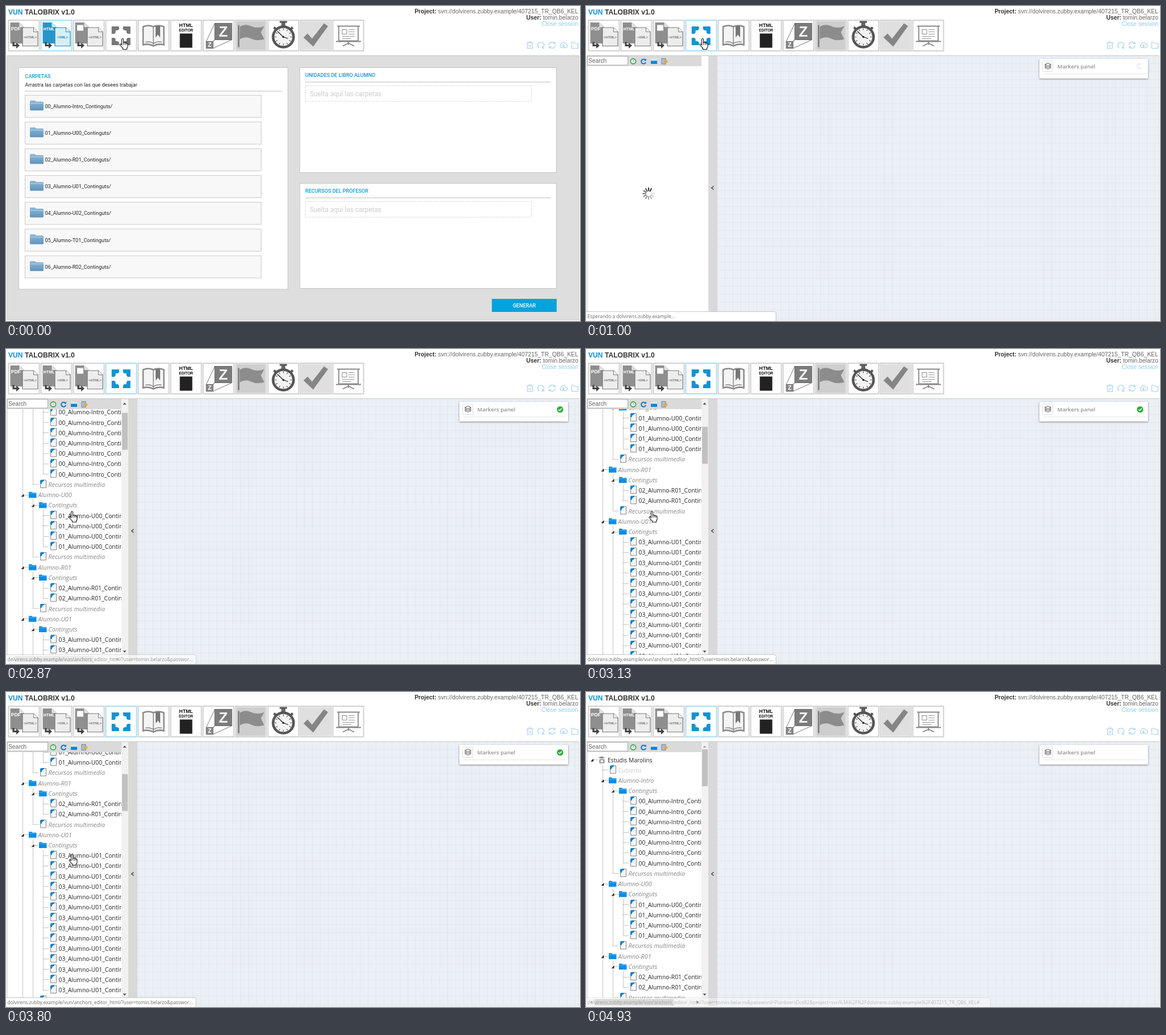
Animation, 1009 px wide and 555 px high, one loop 4.99 s. Source, as an HTML page:

```html
<!DOCTYPE html>
<html lang="es">
<head>
<meta charset="utf-8">
<style>
html, body { margin: 0; width: 100%; height: 100%; overflow: hidden; background: #fff; }
svg { display: block; }
text { white-space: pre; }
.arial { font-family: "Liberation Sans", sans-serif; }
.roboto { font-family: Roboto, sans-serif; }
.open { font-family: "Open Sans", sans-serif; }
.bold { font-weight: 700; }
.medium { font-weight: 500; }
.italic { font-style: italic; }
.cell { --edge: #d2d2d2; --dark: #8f8f8f; --pale: #ededed; --line: #777; --mark: #777; }
.cell.on { --edge: #a9def4; --dark: #2796cb; --pale: #d8edf8; --line: #1c86ba; --mark: #1593d0; }
</style>
</head>
<body>
<svg id="stage" width="1009" height="555" xmlns="http://www.w3.org/2000/svg"></svg>
<script>
const LOOP = 4990, ROW = 18.22;
const HOST = "dolvirens.zubby.example", USER = "tomin.belarzo", PROJECT = "407215_TR_QB6_KEL";
const LINK = `${HOST}/vun/anchors_editor_html/?user=${USER}&password=PlankversDot82` +
  `&project=svn%3A%2F%2F${HOST}%2F${PROJECT}#`;

const rect = (x, y, w, h, fill, more = "") =>
  `<rect x="${x}" y="${y}" width="${w}" height="${h}" fill="${fill}" ${more}/>`;
const path = (d, fill, stroke = "none", width = 1, more = "") =>
  `<path d="${d}" fill="${fill}" stroke="${stroke}" stroke-width="${width}" ${more}/>`;
const line = (d, stroke, width = 1, more = "") => path(d, "none", stroke, width, more);
const circle = (x, y, r, fill, stroke = "none", width = 1) =>
  `<circle cx="${x}" cy="${y}" r="${r}" fill="${fill}" stroke="${stroke}" stroke-width="${width}"/>`;
const text = (x, y, label, size, fill, font = "roboto", more = "") =>
  `<text x="${x}" y="${y}" font-size="${size}" fill="${fill}" class="${font}" ${more}>${label}</text>`;
const at = (x, y, content, more = "") => `<g transform="translate(${x} ${y})" ${more}>${content}</g>`;
const group = (id, content) => `<g id="${id}">${content}</g>`;
const END = 'text-anchor="end"', MID = 'text-anchor="middle"';

// Toolbar icons, drawn inside a 55 px cell
const convert = (from, to) =>
  path("M3.500 4.500H20L28 12V41.500H3.500Z", "var(--dark)") +
  path("M20 4.500V12H28", "#ddd", "#fff", .8) +
  from +
  path("M25 13.500H44.500L52 21V46H25Z", "var(--pale)", "var(--line)", 1.2) +
  path("M44.500 13.500V21H52", "#fff", "var(--line)", 1) +
  text(38.500, 32, `&lt;${to}&gt;`, 5.800, "var(--line)", "arial bold", MID) +
  line("M9 39V45H15", "#444", 3.200) + path("M14 40L20 45L14 50.500Z", "#444");
const fromText = label => text(4.800, 18.500, label, label.length > 3 ? 7.200 : 8.500, "#fff", "arial bold");
const corner = path("M10.500 10.500H23.500V15.500L21 17.500H17.500V21L15.500 23.500H10.500Z", "var(--mark)");
const markers = [0, 90, 180, 270].map(a =>
  `<g transform="translate(.2 1) rotate(${a} 27 27)">${corner}</g>`).join("");
const book =
  path("M9 12Q18 8 27 12Q36 8 45.500 12V44Q36 41 27 46Q18 41 9 44Z", "#f4f4f4", "#8a8a8a", 2.500) +
  line("M27 12V45M13 39Q21 37 27 42Q33 37 42 39", "#8a8a8a", 1.500) +
  path("M31 10.500H39V31L35 26L31 31Z", "#777");
const editor = text(27.500, 12, "HTML", 8.800, "#111", "arial bold", MID) +
  text(27.500, 20.500, "EDITOR", 6.600, "#111", "arial bold", MID) +
  rect(16.500, 24, 22, 25, "#222");
const zoom = line("M6 38L21 6M18 38L51 6M18 50L51 35M6 50L21 35", "#777", 1) +
  rect(21, 6, 30, 29, "#7c7c7c", 'stroke="#666"') + rect(6, 38, 12, 12, "#888", 'stroke="#666"') +
  text(36, 29.500, "Z", 26, "#f4f4f4", "arial bold", MID) +
  text(12, 47.500, "Z", 10, "#fff", "arial bold", MID);
const flag = rect(2, 2, 51, 51, "#cecece") + line("M6 9V48", "#777", 2.500) +
  path("M8 12Q17 6 28 11T51 11L45 22L51 34Q38 38 28 33T8 34Z", "#8c8c8c");
const ticks = [...Array(12)].map((_, i) =>
  line("M27.500 15V18", "#444", 1, `transform="rotate(${i * 30} 27.500 30)"`)).join("");
const watch = rect(24, 3, 7, 8, "#666") + rect(21, 2, 13, 3, "#555") +
  line("M11 13L14 16M44 13L41 16", "#555", 4) +
  circle(27.500, 30, 18, "#f3f3f3", "#555", 4.500) + ticks +
  line("M17 20L27.500 30L36 33", "#222", 1.300) + circle(27.500, 30, 1.800, "#222");
const tick = rect(2, 2, 51, 51, "#dfdfdf") + path("M6 31L13 24L21 33L42 6L49 11L23 47Z", "#858585");
const screen = line("M8 11H48M11 11V37H45V11M28 37V44M18 46L28 41L38 46M6 38H50", "#888", 1.800) +
  rect(17, 17, 8, 8, "none", 'stroke="#888"') +
  line("M28 17H39M28 21H39M28 25H39M17 29H39M17 33H33", "#999", 1.200);

const cells = [
  convert(fromText("PDF"), "HTML"), convert(fromText("HTML"), "XML"),
  convert(rect(7, 9, 11, 10, "#fff"), "HTML"),
  markers, book, editor, zoom, flag, watch, tick, screen
].map((icon, i) => at(4 + 57 * i, 24.500,
  rect(.5, .5, 54, 54, "#fff", 'stroke="var(--edge)" stroke-width="2"') + icon,
  `id="cell${i}" class="cell"`)).join("");

const LIGHT = "#a3cde9";
const links =
  at(921, 69, line("M-6 -4H6M-2 -4V-6H2V-4M-4.500 -4V6H4.500V-4M-1.500 -1V4M1.500 -1V4", LIGHT)) +
  at(940, 69, line("M-2.500 5A5.500 5.500 0 1 1 3 5M3 1.500V5.500H6.500", LIGHT, 1.100)) +
  at(960, 69, line("M-5.500 0A5.500 5.500 0 0 1 4.500 -3M5 -6V-2.500H1.500M5.500 0A5.500 5.500 0 0 1 -4.500 3M-5 6V2.500H-1.500", LIGHT, 1.100)) +
  at(980, 69, line("M-3 4.500A3.200 3.200 0 0 1 -4 -1.500A4 4 0 0 1 3.500 -2.500A3.500 3.500 0 0 1 3 4.500ZM0 -2V3M-2 1L0 3L2 1", LIGHT, 1.100)) +
  at(1000, 69, line("M-5.500 5.500V-5H-1L.5 -3H5.500V5.500Z", LIGHT, 1.100));

const header =
  text(4, 14.500, '<tspan fill="#1191cf">VUN</tspan> TALOBRIX v1.0', 12.100, "#333", "arial bold") +
  text(1006, 12.500, `<tspan class="bold" fill="#333">Project:</tspan> svn://${HOST}/${PROJECT}`, 10.350, "#666", "arial", END) +
  text(1006, 23.800, `<tspan class="bold" fill="#333">User:</tspan> ${USER}`, 10.350, "#666", "arial", END) +
  text(1006, 35, "Close session", 10.350, "#8ccbe8", "arial", END) + cells + links;

// First page: folder list and drop zones
const BLUE = "#1496d2";
const card = (x, y, w, h) => rect(x + .5, y + .5, w, h, "#fff", 'stroke="#c4c4c4"');
const folder = path("M0 3Q0 1 2 1H9L11 3H22Q24 3 24 5V17Q24 18.500 22 18.500H2Q0 18.500 0 17Z", "url(#folderFill)") +
  line("M1 6H23", "#b9d4e8", 1);
const names = ["Intro", "U00", "R01", "U01", "U02", "T01", "R02"];
const list = names.map((name, i) => at(33, 157 + 47.150 * i,
  rect(.5, .2, 415, 39, "#f8f8f8", 'stroke="#c8c8c8"') + at(9, 8.500, folder) +
  text(35.500, 22.800, `0${i}_Alumno-${name}_Continguts/`, 9.100, "#222"))).join("");
const dropZone = (y, title) => card(516, y, 451, 185) +
  text(526, y + 17, title, 9.050, BLUE, "roboto medium") + rect(526, y + 25.500, 432, 1, "#bbb") +
  rect(526.500, y + 32.500, 397, 27.500, "#fff", 'stroke="#d4d4d4" stroke-dasharray="2.500 1.500"') +
  text(534, y + 50.500, "Suelta aquí las carpetas", 11.850, "#ccc");
const home = rect(2, 87.500, 1005, 465.500, "#dedede", 'stroke="#c6c6c6"') + card(22, 108, 473, 390.500) +
  text(33.500, 127, "CARPETAS", 9.050, BLUE, "roboto medium") +
  text(33.500, 142, "Arrastra las carpetas con las que desees trabajar", 9.110, "#222") +
  rect(33, 149.500, 453, 1, "#bbb") + list +
  dropZone(108, "UNIDADES DE LIBRO ALUMNO") + dropZone(312, "RECURSOS DEL PROFESOR") +
  rect(854, 516, 114, 23, "#05a3dd") +
  text(911, 531, "GENERAR", 9.050, "#fff", "roboto medium", MID);

// Second page: tree and canvas
const docIcon = path("M4 .5H10.500V14H.5V4Z", "#f4f6f8", "#858585", 1) + path("M0 7V2Q0 0 2 0H7V2Q3 3 2.500 7Z", "#1480c8");
const folderIcon = path("M0 1.500Q0 .5 1 .5H5L6.500 2H13.500V11H0Z", "#0c8ce6") + line("M0 3.500H13.500", "#6bbcf4", .8);
const expander = path("M0 5H5V0Z", "#222");
const bookcase = path("M0 2L6 0L12 2L6 4ZM2 5H11V12H2Z", "#888") + rect(4, 6.500, 5, 4, "#fff");
const guide = d => line(d, "#888", 1, 'stroke-dasharray="1 1"');

let labels = "", icons = "", row = 0;
const rowY = () => 120 + ROW * row;
function addRow(label, x, icon, style = "italic", fill = "#888") {
  const y = rowY(), open = icon === folderIcon || icon === bookcase, left = x - (icon === docIcon ? 14.500 : 16.500);
  labels += text(x, y + 3.500, label, style ? 10.800 : 10.300, fill, "open " + style);
  icons += guide(`M${x - 27.500} ${Math.round(y) - .5}H${x - 17}`) +
    at(left, y - (icon === docIcon ? 9 : 6.500), icon) + (open ? at(x - 30, y - 2.500, expander) : "");
  row++;
}
addRow("Estudis Marolins", 38, bookcase, "", "#222");
icons += guide("M29.500 128V1400");
addRow("Cubierta", 56.500, docIcon, "italic", "#ccc");
[7, 4, 2, 14, 12].forEach((count, i) => {
  const top = rowY() + 8;
  addRow(`Alumno-${names[i]}`, 56.500, folderIcon);
  addRow("Continguts", 74.500, folderIcon);
  for (let n = 0; n < count; n++) addRow(`0${i}_Alumno-${names[i]}_Continguts`, 92.500, docIcon, "", "#222");
  icons += guide(`M47.500 ${top}V${rowY()}M65.500 ${top + ROW}V${rowY() - ROW}`);
  addRow("Recursos multimedia", 74.500, docIcon);
});

const sideTools = rect(2, 88, 201, 18, "#dadada") + rect(2.500, 88.500, 71, 15.500, "#fff", 'stroke="#aaa"') +
  text(4, 100, "Search", 10.200, "#666", "arial") +
  circle(83, 97.500, 4.500, "#fff", "#3aa655", 1.800) + line("M83 95V98", "#3aa655", 1.200) +
  line("M104.500 95.500A4 4 0 1 0 105 99", "#1479c9", 2) + path("M102 96.500H106V92.500Z", "#1479c9") +
  rect(114, 93, 11, 9, "#1683d0") + rect(114, 93, 11, 3.500, "#d6ecfb") +
  rect(133, 92.500, 7, 10, "#a9bfd4", 'stroke="#6f8aa5"') + path("M137 96H140V94L144 98L140 102V100H137Z", "#f0a33a");
const bars = rect(203, 88, 12, 452, "#f1f1f1") + rect(2, 540, 213, 13, "#f1f1f1") +
  rect(204, 101, 10, 65, "#c1c1c1", 'id="thumb"') + rect(15, 541, 139, 11, "#c1c1c1") +
  path("M205.500 98L208.500 94.500L211.500 98Z", "#505050", "none", 1, 'id="upArrow"') +
  path("M205.500 531.500L208.500 535L211.500 531.500Z", "#505050") +
  path("M11 543.500L7.500 546.500L11 549.500Z", "#a3a3a3") + path("M194.500 543.500L198 546.500L194.500 549.500Z", "#505050");
const layers = [0, 2.800, 5.600].map(d =>
  path(`M806.500 ${103 + d}L812 ${100.500 + d}L817.500 ${103 + d}L812 ${105.500 + d}Z`, "#fff", "#555", 1)).reverse().join("");
const panel = rect(797, 93, 191, 34.500, "#fff", 'filter="url(#shadow)"') +
  rect(802.500, 97, 18, 18.500, "#fff", 'rx="2" stroke="#ddd"') + layers +
  text(828.500, 109.500, "Markers panel", 9.650, "#909090", "open", 'font-weight="600"') +
  rect(804, 119, 180, 1, "#e6e6e6") +
  group("panelSpin", line("M975 102.500A4 4 0 1 0 975 109.500", "#e4e4e4", 1.500)) +
  group("done", circle(974, 106.500, 5.500, "#25ad35") + line("M971.300 106.500L973.300 108.500L977 104.500", "#fff", 1.600));
const spokes = [...Array(12)].map((_, i) =>
  line("M0 -5V-10", "#222", 2, `class="spoke" stroke-linecap="round" transform="rotate(${i * 30})"`)).join("");
const workspace = rect(2, 87.500, 1005, 465.500, "#fff", 'stroke="#c6c6c6"') + rect(215, 88, 16, 465, "#d9d9d9") +
  line("M224.500 317.500L220.500 320.500L224.500 323.500", "#333", 1.200) +
  rect(231, 88, 776, 465, "#ebeff6") + rect(231, 88, 776, 465, "url(#grid)") + panel +
  `<g clip-path="url(#treeArea)">${group("tree", group("treeIcons", icons) + labels)}</g>` +
  at(110, 330.500, spokes, 'id="loader"') + sideTools + group("bars", bars);

const tooltip = rect(204.500, 78, 66, 16, "#fff", 'stroke="#bbb" filter="url(#soft)"') +
  text(207.500, 88.700, "Anchors Editor", 8.500, "#777", "open");
const bubble = `<svg id="bubble" x="0" y="538" width="336" height="17">
  <rect id="bubbleBox" x="-5" y=".5" height="22" rx="3" fill="#fff" stroke="#c4c4c4"/>` +
  text(2.500, 12.200, "", 8.400, "#6a6a6a", "open", 'id="status"') + "</svg>";
const hand = path("M2.500 11V1.700Q2.500 0 4 0T5.500 1.700V7Q8 5.800 8.300 7.500Q10.500 6.500 10.800 8.300Q13 7.500 13 10V13.500Q13 15.500 11.500 17V19H4.500V17Q2 14.500 -.5 11.500Q-1.500 9.500 .5 9.300Z", "#fff", "#111", 1.100) +
  line("M5.500 7V11M8.300 8V11M10.800 9V11", "#111", .9);

const stage = document.getElementById("stage");
stage.innerHTML = `<defs>
  <linearGradient id="folderFill" x2="0" y2="1"><stop stop-color="#8fb9d8"/><stop offset="1" stop-color="#5f93bd"/></linearGradient>
  <pattern id="grid" x="231" y="88" width="14" height="14" patternUnits="userSpaceOnUse">${line("M13.500 0V14M0 13.500H14", "#e2e7ee")}</pattern>
  <clipPath id="treeArea">${rect(2, 106, 200.500, 434, "#000")}</clipPath>
  <filter id="shadow" x="-10%" y="-30%" width="120%" height="170%"><feDropShadow dx="0" dy="1" stdDeviation="1.500" flood-opacity=".5"/></filter>
  <filter id="soft"><feDropShadow dx="1" dy="1" stdDeviation=".7" flood-opacity=".25"/></filter>
</defs>` + header + group("home", home) + group("workspace", workspace) +
  group("tooltip", tooltip) + bubble + group("cursor", hand);

const $ = id => document.getElementById(id);
const set = (id, name, value) => $(id).setAttribute(name, value);
const show = (id, visible) => set(id, "opacity", +visible);

// Piecewise linear value through [time, value] points
function follow(t, ...points) {
  if (t <= points[0][0]) return points[0][1];
  for (let i = 1; i < points.length; i++) {
    const [t0, v0] = points[i - 1], [t1, v1] = points[i];
    if (t < t1) return v0 + (v1 - v0) * (t - t0) / (t1 - t0);
  }
  return points[points.length - 1][1];
}

function render(time) {
  const t = Math.floor((time + 4) * .015) / .015; // the screen refreshes 15 times a second
  const editing = t > 660, opened = t > 900, loaded = t > 2260;
  $("cell1").classList.toggle("on", !editing);
  $("cell3").classList.toggle("on", editing);
  show("home", !opened);
  show("workspace", opened);
  set("tooltip", "opacity", opened ? 0 : follow(t, [200, 0], [460, 1]));

  show("loader", t < 1660);
  const head = 1 + Math.round((t - 1000) * .015);
  document.querySelectorAll(".spoke").forEach((spoke, i) =>
    spoke.setAttribute("opacity", 1 - ((head - i + 120) % 12) / 12));
  show("panelSpin", t < 1720);
  set("panelSpin", "transform", `rotate(${(head - 1) * 30} 974 106.500)`);
  set("done", "opacity", follow(t, [1650, 0], [1790, 1], [3800, 1], [4130, 0]));

  const scroll = Math.round(follow(t, [2740, 0], [3133.3, 253], [3466.7, 470], [3800, 305], [4266.7, 0]));
  show("tree", loaded);
  show("bars", loaded);
  show("treeIcons", t > 2390);
  set("tree", "transform", `translate(0 ${-scroll})`);
  set("thumb", "y", 101 + scroll * .143);
  set("upArrow", "fill", scroll ? "#505050" : "#a3a3a3");

  const x = follow(t, [2400, 201], [2750, 112]);
  const y = follow(t, [2400, 57.500], [2750, 286], [3870, 286], [4330, 475], [4600, 570]);
  set("cursor", "transform", `translate(${x} ${y})`);

  const width = follow(t, [4340, 335], [4660, 712]);
  $("status").textContent = t < 2000 ? `Esperando a ${HOST}...` : width > 335 ? LINK : LINK.slice(0, 75) + "...";
  set("bubble", "width", width);
  set("bubbleBox", "width", width + 4);
  set("bubble", "opacity", follow(t, [660, 0], [790, 1], [1460, 1], [1660, 0], [2730, 0], [2930, 1], [4800, 1], [5020, 0]));
}

function frame() {
  render(performance.now() % LOOP);
  requestAnimationFrame(frame);
}
frame();
</script>
</body>
</html>
```
